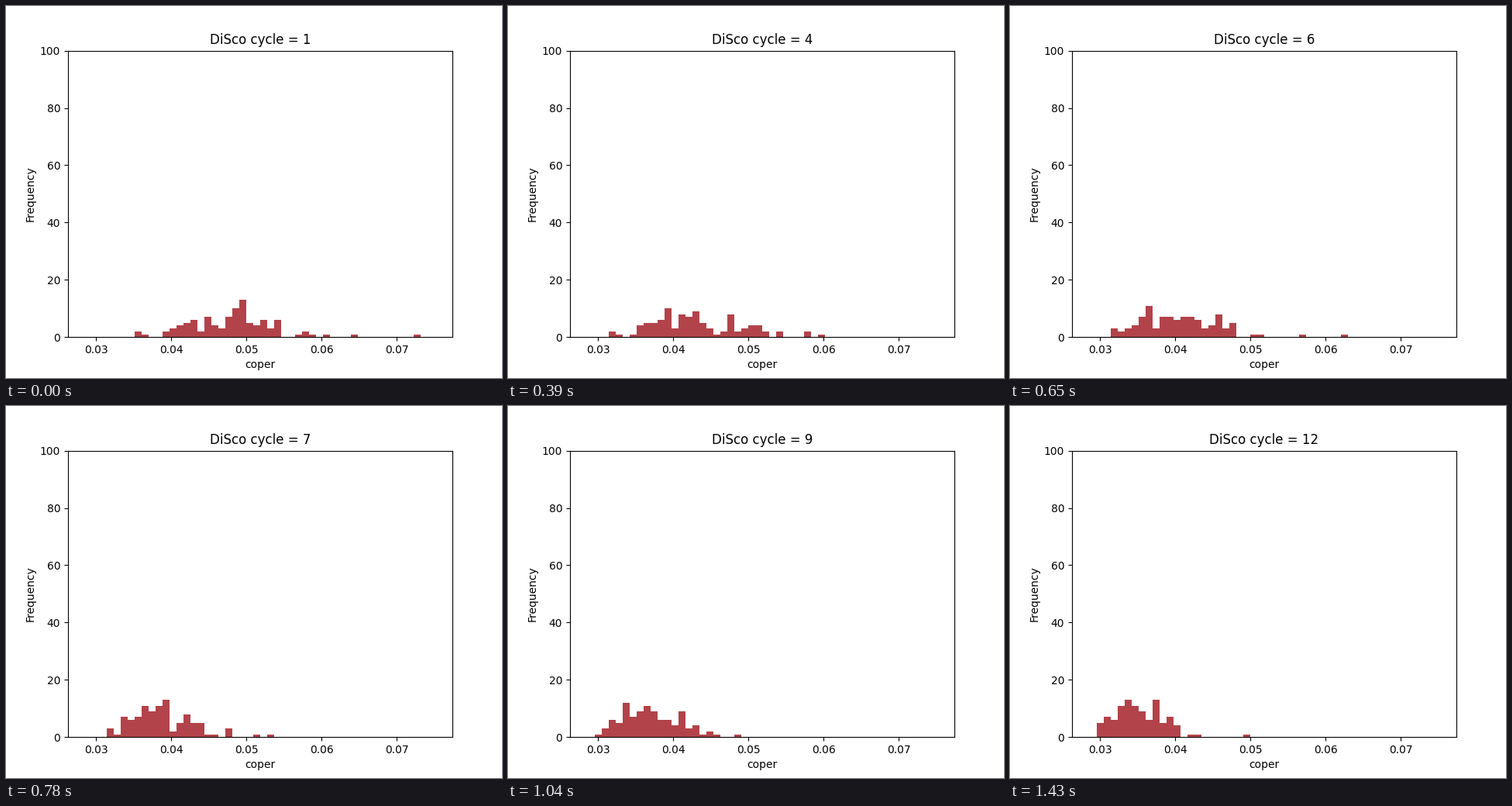
Animation of 640 by 480 pixels, one loop 1.56 s. Source, as a matplotlib script:

```python
import matplotlib.pyplot as plt
import numpy as np
from matplotlib.animation import FuncAnimation

CYCLES = 12
BINS = 50
SAMPLES = 100
INTERVAL = 130
LOW, HIGH = 0.02858, 0.07507
BAR_COLOR = "#b2434a"

edges = np.linspace(LOW, HIGH, BINS + 1)


def histogram(cycle):
    """Gamma-distributed population whose mean decays towards the lower bound."""
    rng = np.random.default_rng(cycle)
    shape = 9.4 * np.exp(-(cycle - 1) / 10)
    values = LOW + rng.gamma(shape, 0.00215, SAMPLES)
    return np.histogram(np.clip(values, LOW, HIGH), edges)[0]


fig, ax = plt.subplots(figsize=(6.4, 4.8), dpi=100)
bars = ax.bar(edges[:-1], histogram(1), width=np.diff(edges), align="edge", color=BAR_COLOR)
margin = 0.05 * (HIGH - LOW)
ax.set_xlim(LOW - margin, HIGH + margin)
ax.set_ylim(0, 100)
ax.set_xlabel("coper")
ax.set_ylabel("Frequency")
title = ax.set_title("DiSco cycle = 1")


def update(frame):
    cycle = frame + 1
    for bar, height in zip(bars, histogram(cycle)):
        bar.set_height(height)
    title.set_text(f"DiSco cycle = {cycle}")
    return [*bars, title]


animation = FuncAnimation(fig, update, frames=CYCLES, interval=INTERVAL,
                          repeat=True, repeat_delay=0)
plt.show()
```
